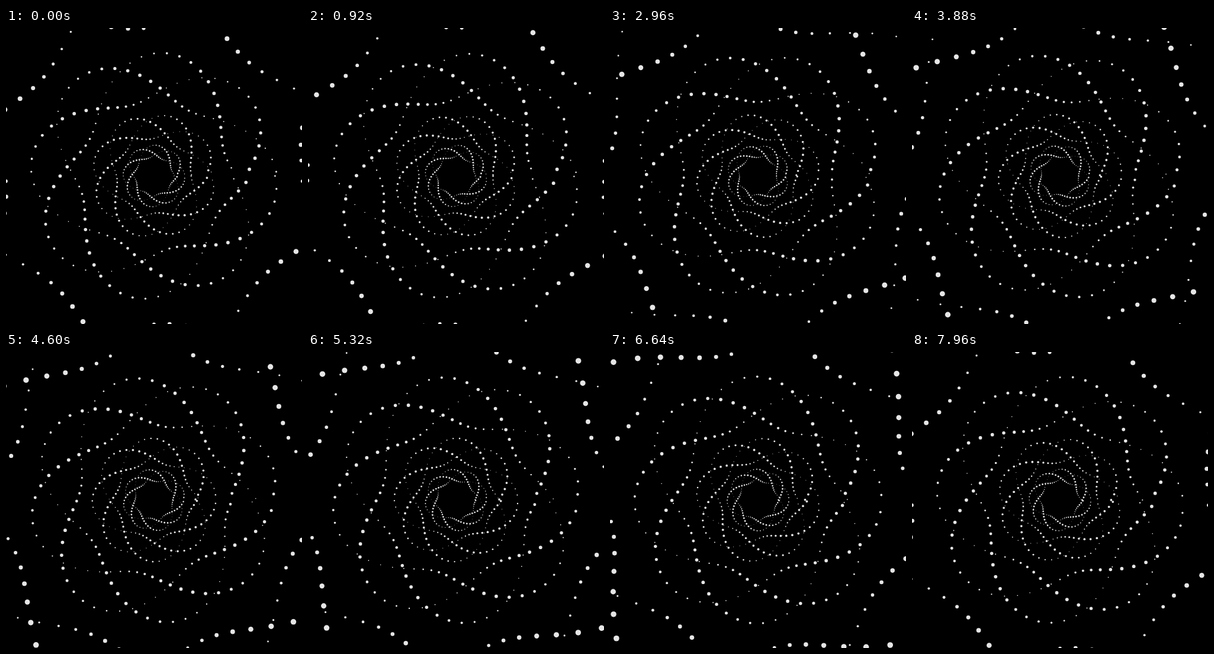
An HTML page that plays this animation: 500 px wide and 500 px high, repeating every 8000 ms.

```html
<!DOCTYPE html>
<html lang="en">
<head>
<meta charset="utf-8">
<title>Coiled dot rings</title>
<style>
  html, body { margin: 0; width: 100%; height: 100%; overflow: hidden; background: #000; }
  svg { display: block; width: 100vw; height: 100vh; }
</style>
</head>
<body>
<svg viewBox="0 0 500 500" fill="#e6e6e6"></svg>
<script>
const LOOP = 8000;
const DOTS = 180;
const STEP = 2 * Math.PI / DOTS;
const TWIST = 2; // radians of coil per dot
const CENTER = 250;

const rings = [
  { radius: 41.7, phase: 2.434 },
  { radius: 83.4, phase: 3.009 },
  { radius: 166.8, phase: 0.443 },
  { radius: 333.5, phase: 1.01 }
];

const svg = document.querySelector('svg');
const dots = [];
for (const ring of rings) {
  for (let index = 0; index < DOTS; index++) {
    const node = document.createElementNS(svg.namespaceURI, 'circle');
    svg.append(node);
    dots.push({ node, ring, index });
  }
}

function render(time) {
  const progress = (time % LOOP) / LOOP;
  for (const { node, ring, index } of dots) {
    const place = index + progress;
    const angle = place * STEP;
    const coil = ring.phase + place * TWIST;
    const distance = ring.radius * (1 + 0.25 * Math.cos(coil));
    const size = (0.6 + 0.0075 * ring.radius) * (1 - 0.56 * Math.sin(coil));
    node.setAttribute('cx', (CENTER + distance * Math.cos(angle)).toFixed(2));
    node.setAttribute('cy', (CENTER + distance * Math.sin(angle)).toFixed(2));
    node.setAttribute('r', size.toFixed(2));
  }
}

const start = performance.now();
function tick() {
  render(performance.now() - start);
  requestAnimationFrame(tick);
}
tick();
</script>
</body>
</html>
```
